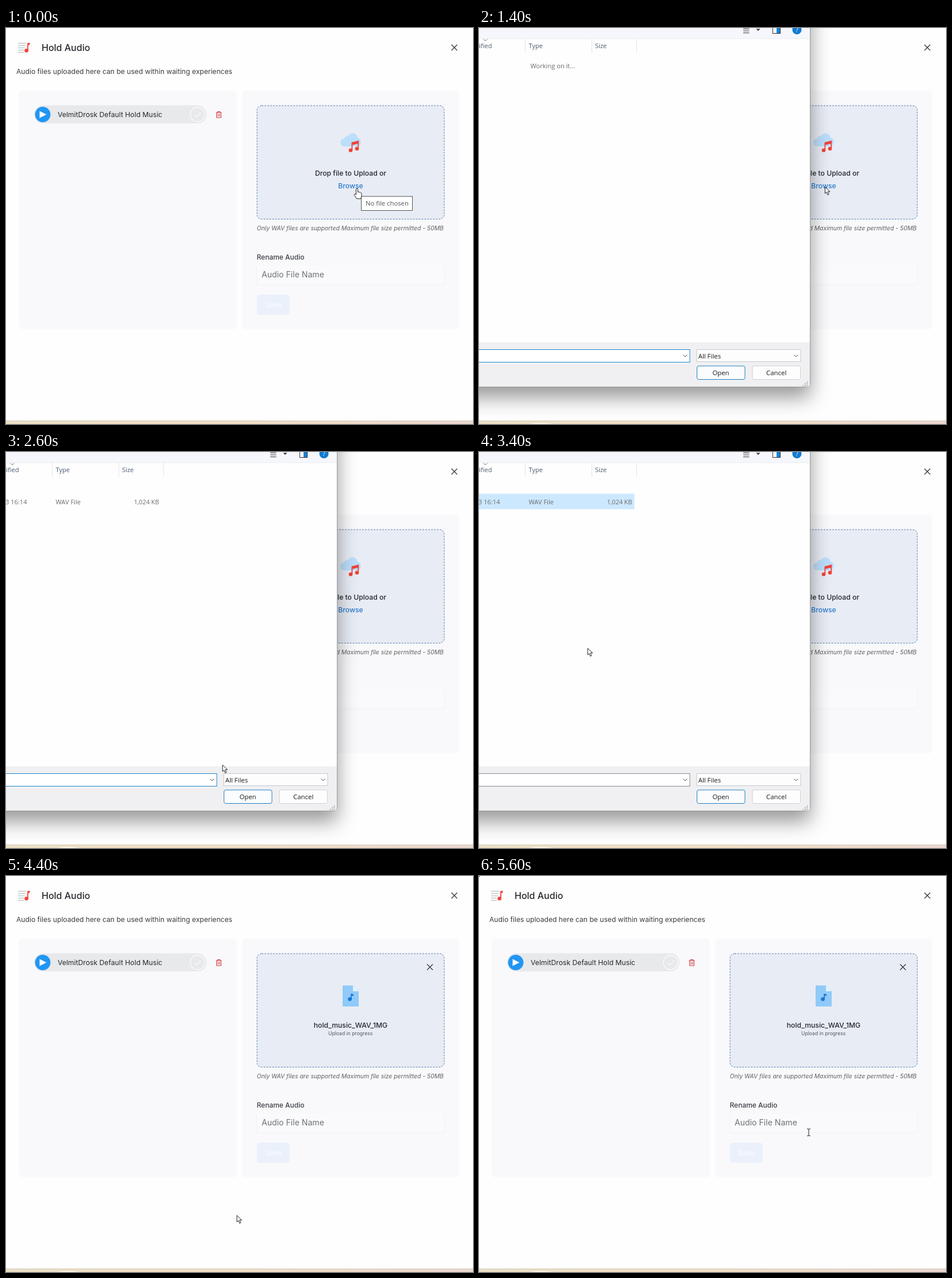
These frames come from a looping animation (813x689 px, 8 s). An HTML page:

```html
<!DOCTYPE html>
<html lang="en">
<head>
<meta charset="utf-8">
<title>Hold audio upload</title>
<style>
html, body { margin: 0; width: 100%; height: 100%; overflow: hidden; background: #fefefe; }
svg { display: block; width: 100%; height: 100%; }
text { font: 400 12.2px Inter, sans-serif; fill: #25282d; }
.medium { font-weight: 500; }
.mid { text-anchor: middle; }
.end { text-anchor: end; }
.sys, .sys text { font-family: "Open Sans", "Noto Sans", sans-serif; font-size: 11.1px; }
.sys .grey { fill: #6b6b6b; }
.sys .head { fill: #4c5c70; }
.sys .button { font-size: 11.4px; fill: #1a1a1a; }
.line { fill: none; stroke: #333; stroke-width: 1.2; }
#frame { filter: drop-shadow(0 18px 17px rgba(0, 0, 0, .4)); }
</style>
</head>
<body>
<svg viewBox="0 0 813 689" preserveAspectRatio="none">
  <defs>
    <linearGradient id="bar">
      <stop offset="0" stop-color="#ebe0c6"/>
      <stop offset=".45" stop-color="#f1dfc4"/>
      <stop offset="1" stop-color="#ead8d0"/>
    </linearGradient>
    <path id="cross" class="line" d="M-5-5 5 5M5-5-5 5"/>
  </defs>
  <rect width="813" height="689" fill="#fefefe"/>

  <g id="page">
    <path d="M21 26.5H35M21 30.5H34M21 34.5H33M21 38.5H31M21 42.5H31" stroke="#c3c6cb" stroke-width="1.4"/>
    <path d="M37 26.5 41.5 25.5V29L38.8 29.8V39H37Z" fill="#f0433a"/>
    <circle cx="35.6" cy="39.2" r="3.3" fill="#f0433a"/>
    <text class="medium" x="62" y="39.6" style="font-size:16px">Hold Audio</text>
    <use href="#cross" x="780.5" y="34"/>
    <text x="18" y="80.4" style="font-size:12.13px;fill:#3a3d42">Audio files uploaded here can be used within waiting experiences</text>

    <g fill="#f9f9fc">
      <rect x="22" y="109" width="380" height="415" rx="6"/>
      <rect x="411" y="109" width="378" height="415" rx="6"/>
    </g>
    <rect x="49" y="134.5" width="300" height="31.5" rx="15.7" fill="#e8e9eb"/>
    <circle cx="64" cy="150.5" r="13.4" fill="#2196f3"/>
    <path d="M58.5 144.5 70.5 150.5 58.5 156.5Z" fill="#fff"/>
    <text x="90" y="154.6">VelmitDrosk Default Hold Music</text>
    <circle cx="333.5" cy="150.5" r="12.4" fill="none" stroke="#f9f9fa" stroke-width="1.6"/>
    <path d="M328 151 332 154.5 339.5 147" fill="none" stroke="#f9f9fa" stroke-width="1.4"/>
    <path d="M365.5 147.3H375.5M368.3 147V145.5H372.7V147M366.7 147.5V156H374.3V147.5M369.2 149.5V154M371.8 149.5V154" fill="none" stroke="#d2383c" stroke-width="1.1"/>

    <rect x="437" y="135" width="326" height="197.5" rx="8" fill="#e8ecf4" stroke="#5580aa" stroke-dasharray="3 2"/>
    <g id="dropHint">
      <path d="M589 206A6.7 6.7 0 0 1 588.5 192.6 7 7 0 0 1 596 187.5 8.3 8.3 0 0 1 611.5 190.5 7.9 7.9 0 0 1 611 206Z" fill="#bbdefb"/>
      <path d="M601.5 199 614.2 195.8V209.5H612.4V201.2L603.3 203.5V212.5H601.5Z" fill="#f0433a"/>
      <circle cx="600" cy="212.8" r="3.3" fill="#f0433a"/>
      <circle cx="611" cy="210" r="3.3" fill="#f0433a"/>
      <text class="medium mid" x="600" y="256.5">Drop file to Upload or</text>
      <text class="medium mid" x="600" y="278.7" style="fill:#2b7bd0">Browse</text>
    </g>
    <g id="fileInfo">
      <use href="#cross" x="738" y="158.5"/>
      <path d="M586 190.5H604L614 200.5V227H586Z" fill="#90caf9"/>
      <path d="M604 190.5V200.5H614Z" fill="#e3f2fd"/>
      <path d="M600.3 204.5 605 206V208.8L602 208V214.5H600.3Z" fill="#1976d2"/>
      <circle cx="598.6" cy="214.3" r="3.3" fill="#1976d2"/>
      <text class="medium mid" x="600" y="264.3">hold_music_WAV_1MG</text>
      <text class="mid" x="599.7" y="277.4" style="font-size:8.65px;fill:#54585f">Upload in progress</text>
    </g>
    <text x="436.5" y="352.4" style="font-size:10.4px;font-style:italic;fill:#62605f">Only WAV files are supported Maximum file size permitted - 50MB</text>
    <text class="medium" x="436.5" y="403.2" style="font-size:12px;fill:#3b3f45">Rename Audio</text>
    <path d="M436.5 414V446.5H763.5V414" fill="#fafafc" stroke="#f2f2f5"/>
    <text x="445" y="434.4" style="font-size:14.1px;fill:#6d7278">Audio File Name</text>
    <rect x="436.5" y="464" width="57.5" height="35" rx="5" fill="#ebf1fb"/>
    <text class="medium mid" x="465.4" y="485.6" style="font-size:12px;fill:#f8fafe">Save</text>
  </g>

  <g id="dialog" class="sys">
    <rect id="frame" x="-300" y="-300" width="876.5" height="924.5" rx="6" fill="#fefefe" stroke="#9b9b9d"/>
    <path d="M0 0H576V18H0Z" fill="#f6f7fc"/>
    <path d="M0 18.5H576" stroke="#ececf0"/>
    <path d="M80.5 19V44M196.5 19V44M274.5 19V44" stroke="#e6e6e8"/>
    <path class="line" d="M7.5 19.5 11 22.5 14.5 19.5" style="stroke:#777;stroke-width:1"/>
    <path class="line" d="M460 1.5H470.5M460 5H470.5M460 8.5H470.5"/>
    <path d="M482.5 1.5H489.5L486 5Z" fill="#333"/>
    <rect x="511.5" y="-4" width="13" height="13.5" fill="#fff" stroke="#333"/>
    <path d="M518 0H524V9H518Z" fill="#1683d8"/>
    <circle cx="553.5" cy="3" r="8" fill="#0f7bd1"/>
    <text class="mid" x="553.5" y="7" style="fill:#fff">?</text>
    <text class="head end" x="22.5" y="35.4">Date modified</text>
    <text class="head" x="86.5" y="35.4">Type</text>
    <text class="head" x="202" y="35.4">Size</text>

    <text id="working" class="grey" x="89.5" y="70.3">Working on it...</text>
    <g id="fileRow">
      <rect id="rowFill" x="-1" y="72.5" width="271.5" height="27"/>
      <text class="grey end" x="36.5" y="91.2">3 16:14</text>
      <text class="grey" x="86.5" y="91.2">WAV File</text>
      <text class="grey end" x="266.5" y="91.2" style="font-size:10.8px">1,024 KB</text>
    </g>

    <path d="M0 547H576V619Q576 624 571 624H0Z" fill="#f0f0f2"/>
    <rect id="nameField" x="-9" y="559.5" width="376" height="22" fill="#fff"/>
    <rect x="379" y="559.5" width="181" height="21" fill="#fdfdfe" stroke="#c3c8ce"/>
    <path class="line" d="M355.5 568.5 359 572 362.5 568.5M548.5 568.5 552 572 555.5 568.5" style="stroke:#555;stroke-width:1"/>
    <text class="button" x="381.7" y="574.5">All Files</text>
    <rect id="openButton" x="379.5" y="588" width="83.5" height="23.5" rx="3"/>
    <text class="button mid" x="421" y="604">Open</text>
    <rect x="476" y="588" width="83.5" height="23.5" rx="3" fill="#fdfdfd" stroke="#d0d0d2"/>
    <text class="button mid" x="517.7" y="604">Cancel</text>
    <path d="M571.5 615V617M571.5 618V620M571.5 621V623M568 618V620M568 621V623M564.5 621V623" stroke="#b4b4b6" stroke-width="2"/>
  </g>

  <rect y="683" width="813" height="6" fill="url(#bar)"/>
  <path d="M0 683.5H813" stroke="#d3c6b7"/>
  <ellipse id="taskGlow" cx="108" cy="690" rx="20" ry="2.8" fill="#fdf9f2"/>
  <circle id="cornerDot" r="1.6" fill="#444"/>

  <g id="tooltip" class="sys">
    <rect x="618.5" y="293" width="89" height="24.5" fill="#fff" stroke="#555"/>
    <text x="626" y="309.2" style="font-size:11.3px;fill:#555">No file chosen</text>
  </g>
  <g id="cursor" fill="#fff" stroke="#222" stroke-linejoin="round">
    <path id="hand" d="M-1.5 11V1.2Q0-1 1.5 1.2V6.5Q3 5.2 4.2 7 5.5 6 6.5 7.7 8 7.2 8 9.5V13Q8 15 6.5 18H-.5Q-1.5 15.5-5 11.5-4.7 8.5-1.5 11Z"/>
    <path id="arrow" d="M.5.5V12L3.2 9.6 5 14.3 7.2 13.4 5.2 8.8H9Z"/>
    <path id="beam" fill="none" d="M-3-6H-1Q0-6 0-5 0-6 1-6H3M0-5V5M-3 6H-1Q0 6 0 5 0 6 1 6H3"/>
  </g>
</svg>
<script>
const LOOP = 8000, STEP = 200;
const $ = id => document.getElementById(id);
const show = (id, on) => { $(id).style.display = on ? "" : "none"; };
const paint = (id, fill, stroke = "none") => {
  $(id).setAttribute("fill", fill);
  $(id).setAttribute("stroke", stroke);
};

// Pointer stops: time, x, y
const stops = [
  [0, 611, 279], [400, 611, 279], [800, 602, 276], [1800, 602, 276],
  [2600, 376.5, 544], [3000, -24, 92], [3200, -24, 92],
  [3600, 401.5, 590], [4800, 401.5, 590], [5600, 574, 446], [LOOP, 574, 446]
];

function pointerAt(t) {
  const i = stops.findIndex(s => s[0] > t);
  const [t0, x0, y0] = stops[i - 1], [t1, x1, y1] = stops[i];
  const p = (t - t0) / (t1 - t0), e = p * p * (3 - 2 * p);
  return [x0 + (x1 - x0) * e, y0 + (y1 - y0) * e];
}

function draw(t) {
  const uploaded = t >= 4400;
  show("tooltip", t < 600);
  show("dropHint", !uploaded);
  show("fileInfo", uploaded);
  show("dialog", t >= 1400 && !uploaded);
  show("working", t < 2000);
  show("fileRow", t >= 2000);
  show("taskGlow", t >= 1200);
  show("cornerDot", t >= 5600);

  paint("rowFill", t < 3000 ? "none" : t < 3200 ? "#e5f3ff" : t < 4000 ? "#cce8ff" : "#d9d9d9");
  paint("nameField", "#fff", t < 3200 ? "#1f85c9" : "#8a8a8c");
  if (t < 3600) paint("openButton", "#fbfcfd", "#1f7fc4");
  else if (t < 4000) paint("openButton", "#e5f1fb", "#1f7fc4");
  else paint("openButton", "#cce4f7", "#1d6299");

  const shape = t < 1000 ? "hand" : t < 5400 ? "arrow" : "beam";
  for (const id of ["hand", "arrow", "beam"]) show(id, id === shape);
  $("cursor").setAttribute("transform", `translate(${pointerAt(t)})`);
}

function tick() {
  draw(Math.floor(performance.now() % LOOP / STEP) * STEP);
  requestAnimationFrame(tick);
}
tick();
</script>
</body>
</html>
```
